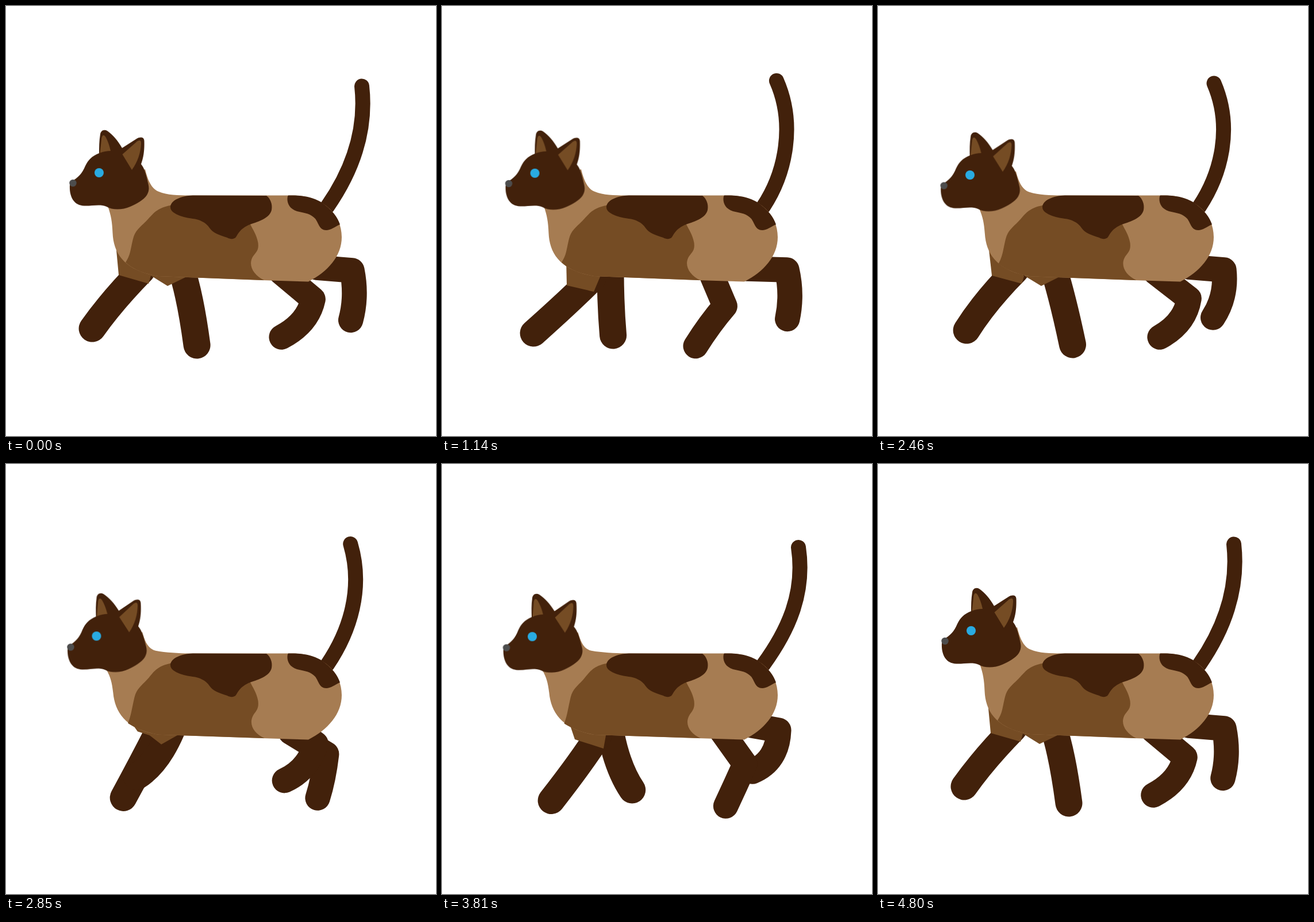
Write an HTML page without scripts that moves like this. It is 748 px wide and 748 px high and loops after 4.95 s.

```html
<!DOCTYPE html>
<html lang="en">
<head>
<meta charset="utf-8">
<title>Walking cat</title>
<style>
html, body { margin: 0; width: 100%; height: 100%; overflow: hidden; background: #fff; }
svg { display: block; width: 100vw; height: 100vh; }
:root { --dark: #42210b; --brown: #754c24; --tan: #a67c52; }
.dark { fill: var(--dark); }
.brown { fill: var(--brown); }
.tan { fill: var(--tan); }
.limb { fill: none; stroke: var(--dark); stroke-linecap: round; stroke-linejoin: round; }
.fore { stroke-width: 47px; }
.hind { stroke-width: 43.5px; }
.tail { stroke-width: 26px; }

/* 4.8 s of motion (two strides, four nods, one tail sway), then a short rest */
.limb, .cuff, .nod { animation: 4.95s linear infinite; }
.tail { animation-name: tail; }
.far.fore { animation-name: far-fore; }
.near.fore { animation-name: near-fore; }
.far.hind { animation-name: far-hind; }
.near.hind { animation-name: near-hind; }
.far.cuff { animation-name: far-cuff; }
.near.cuff { animation-name: near-cuff; }
.head { animation-name: head; transform-origin: 495px 457px; }
.trunk { animation-name: trunk; }
.saddle { animation-name: saddle; }

@keyframes tail {
  0%, 96.97%, 100% { d: path("M559 349C600 290 628 220 619 139.5"); }
  23.03% { d: path("M559 349C598 290 615 205 582 130"); animation-timing-function: ease-out; }
  35.5% { d: path("M559 349C590 290 606 206 563 126.5"); animation-timing-function: ease-in; }
  38.788% { d: path("M559 349C590 290 606 207 564.5 127"); }
  49.697% { d: path("M559 349C598 290 617 210 584.5 134.5"); }
  66.061% { d: path("M559 349C600 290 627 222 615 144"); animation-timing-function: ease-out; }
  76.97% { d: path("M559 349C602 290 632 225 620 145"); }
  87.27% { d: path("M559 349C603 290 633 222 623 143.5"); animation-timing-function: ease-in; }
}

@keyframes far-fore {
  0%, 48.485%, 96.97%, 100% { d: path("M236 460Q185 512 150 561"); }
  1.212%, 49.697% { d: path("M239 460Q187 512 154 564"); }
  9.394%, 57.879% { d: path("M266 465Q240 518 206 581"); }
  17.576%, 66.061% { d: path("M284 460Q281 525 259 572"); }
  23.03%, 71.515% { d: path("M293 460Q293 520 297.5 573"); }
  28.485%, 76.97% { d: path("M294 470Q306 530 331 567"); }
  38.788%, 87.273% { d: path("M262 462Q230 515 172 529"); }
  44.848%, 93.333% { d: path("M245 468Q195 520 142 544"); }
}
@keyframes near-fore {
  0%, 48.485%, 96.97%, 100% { d: path("M304 455Q320 500 332 590"); }
  1.212%, 49.697% { d: path("M305 455Q322 510 338.5 589"); }
  4.242%, 52.727% { d: path("M304 462Q318 530 339 573"); }
  11.515%, 60% { d: path("M280 464Q236 517 172 529"); }
  17.576%, 66.061% { d: path("M262 476Q205 522 143.5 545"); }
  23.03%, 71.515% { d: path("M262 473Q220 515 159 569"); }
  28.485%, 76.97% { d: path("M272 472Q245 515 190 585.5"); }
  38.788%, 87.273% { d: path("M306 465Q295 530 265.5 590"); }
}
@keyframes far-cuff {
  0%, 48.485%, 96.97%, 100% { d: path("M192 425L196 468 248 483 252 469 230 430Z"); }
  1.212%, 49.697% { d: path("M193 425L198 469 250 483 254 470 230 430Z"); }
  9.394%, 57.879% { d: path("M222 455L230 465 282 482 288 470 250 430Z"); }
  17.576%, 66.061% { d: path("M240 440L250 460 285 466 290 460 260 430Z"); }
  38.788%, 87.273% { d: path("M220 430L232 450 262 464 270 455 250 430Z"); }
  44.848%, 93.333% { d: path("M205 440L206 465 255 486 260 468 240 430Z"); }
}
@keyframes near-cuff {
  0%, 48.485%, 96.97%, 100% { d: path("M240 460L252 469 281 487 312 472 270 440Z"); }
  1.212%, 49.697% { d: path("M242 460L256 470 284 487 314 472 272 440Z"); }
  11.515%, 60% { d: path("M230 440L234 462 266 488 300 468 262 430Z"); }
  17.576%, 66.061% { d: path("M219 440L219 470 265 496 278 468 250 430Z"); }
  23.03%, 71.515% { d: path("M216 440L217 486 264 497 275 471 250 430Z"); }
  28.485%, 76.97% { d: path("M223 455L231 479 281 495 285 472 255 430Z"); }
  38.788%, 87.273% { d: path("M240 455L252 468 268 483 323 472 280 440Z"); }
}
@keyframes far-hind {
  0%, 48.485%, 96.97%, 100% { d: path("M478 463L534 510Q525 552 479 576"); }
  1.212%, 49.697% { d: path("M482 463L541 509Q534 552 490 576"); }
  12.121%, 60.606% { d: path("M500 468L564 503Q560 545 562 583"); }
  17.576%, 66.061% { d: path("M500 463L585 481Q597 522 611.5 564.5"); }
  23.03%, 71.515% { d: path("M530 457L600 459Q610 502 601 544.5"); }
  28.485%, 76.97% { d: path("M540 455L586 463Q584 517 540 535"); }
  38.788%, 87.273% { d: path("M462 470L485 517Q455 552 414.5 565.5"); }
}
@keyframes near-hind {
  0%, 48.485%, 96.97%, 100% { d: path("M540 455L602 460Q611 505 600 546.5"); }
  1.212%, 49.697% { d: path("M540 454L602 459Q607 505 583 542"); }
  4.848%, 53.333% { d: path("M540 455L588 463Q584 517 542 537"); }
  14.545%, 63.03% { d: path("M458 468L477 517Q450 552 411 568"); }
  17.576%, 66.061% { d: path("M454 462L466 520Q437 550 413.5 587"); }
  23.03%, 71.515% { d: path("M468 465L492 522Q466 552 441 591.5"); }
  28.485%, 76.97% { d: path("M485 463L527 522Q510 560 493.5 595"); }
  38.788%, 87.273% { d: path("M520 485L558 507Q552 545 552 594"); }
}

@keyframes head {
  0%, 24.242%, 48.485%, 72.727%, 96.97%, 100% { transform: none; animation-timing-function: cubic-bezier(.2, .4, .6, 1); }
  6.061%, 30.303%, 54.545%, 78.788% { transform: rotate(-1.95deg); animation-timing-function: cubic-bezier(.4, 0, .7, .6); }
  14.303%, 38.545%, 62.788%, 87.03% { transform: rotate(.1deg); animation-timing-function: ease-out; }
  18.182%, 42.424%, 66.667%, 90.909% { transform: rotate(1.08deg); animation-timing-function: ease-in-out; }
  23.03%, 47.273%, 71.515%, 95.758% { transform: rotate(-.15deg); }
}
@keyframes trunk {
  0%, 24.242%, 48.485%, 72.727%, 96.97%, 100% { d: var(--trunk-mid); animation-timing-function: cubic-bezier(.2, .4, .6, 1); }
  6.061%, 30.303%, 54.545%, 78.788% { d: var(--trunk-low); animation-timing-function: cubic-bezier(.4, 0, .7, .6); }
  14.303%, 38.545%, 62.788%, 87.03% { d: var(--trunk-mid); animation-timing-function: ease-out; }
  18.182%, 42.424%, 66.667%, 90.909% { d: var(--trunk-high); animation-timing-function: ease-in-out; }
  23.03%, 47.273%, 71.515%, 95.758% { d: var(--trunk-mid); }
}
@keyframes saddle {
  0%, 24.242%, 48.485%, 72.727%, 96.97%, 100% { d: var(--saddle-mid); animation-timing-function: cubic-bezier(.2, .4, .6, 1); }
  6.061%, 30.303%, 54.545%, 78.788% { d: var(--saddle-low); animation-timing-function: cubic-bezier(.4, 0, .7, .6); }
  14.303%, 38.545%, 62.788%, 87.03% { d: var(--saddle-mid); animation-timing-function: ease-out; }
  18.182%, 42.424%, 66.667%, 90.909% { d: var(--saddle-high); animation-timing-function: ease-in-out; }
  23.03%, 47.273%, 71.515%, 95.758% { d: var(--saddle-mid); }
}
.trunk {
  --trunk-mid: path("M242 284C246 300 252 318 266 323C280 329 300 329.5 320 329.5L500 329.5C548 330 584 360 584 402C584 435 560 462 526 479.5L445 477 265 470C205 460 187 430 185.5 395C184.5 375 183 365 177 348L200 300Z");
  --trunk-low: path("M236 294C240 308 245 322 259 325C278 328 300 329 320 329.5L500 329.5C548 330 584 360 584 402C584 435 560 462 526 479.5L445 477 265 471C212 462 190 435 186.5 398C184 380 182 373 174 359L200 310Z");
  --trunk-high: path("M246 278C250 295 256 317 271 323C285 329 302 329.5 320 329.5L500 329.5C548 330 584 360 584 402C584 435 560 462 526 479.5L445 477 265 468C205 458 187 428 185.5 395C185 375 184 362 179 343L200 296Z");
}
.saddle {
  --saddle-mid: path("M300 345C262 348 256 362 244 374C232 386 225 390 221 405C216 425 217 432 208 446C219.5 457 238 465.5 265 470L449 477C430 468 420 450 430 435C436 427 440 424 438.5 412C436 398 430 390 424 378Z");
  --saddle-low: path("M300 345C262 348 257 363 246 375C235 387 228 391 224 406C219 428 218 438 213 452C227 460.5 244 467 265 471L450 477C431 469 421 452 431 436C437 428 440 424 438.5 412C436 398 430 390 424 378Z");
  --saddle-high: path("M300 345C262 348 256 362 244 374C232 386 225 390 220 404C215 423 215 429 206 442C219 455 238 463.5 265 468L448 477C429 468 419 449 429 434C436 426 440 424 438.5 412C436 398 430 390 424 378Z");
}
</style>
</head>
<body>
<svg viewBox="0 0 748 748">
  <path class="limb hind far"/>
  <path class="limb fore far"/>
  <path class="cuff far brown"/>
  <path class="limb hind near"/>
  <path class="limb fore near"/>
  <path class="cuff near brown"/>
  <path class="limb tail"/>

  <path class="nod trunk tan"/>
  <path class="nod saddle brown"/>
  <path class="dark" d="M286 350C286 338 305 330 325 329.5L453 330C460 335 464 345 462 355C458 372 430 377 420 382C408 388 404 395 400 402C397 406 390 406 385 403C370 398 360 395 354 386C348 376 335 371 325 370C310 368 286 362 286 350Z"/>
  <path class="dark" d="M490 331C488 340 491 352 506 357C520 360 530 361 538 370C544 378 545 390 557 390C565 390 572 384 581 380C577 368 568 355 548 341C530 331 512 329 491 329.5Z"/>

  <g class="nod head">
    <path class="dark" d="M111 312C110 330 117 347 136 347.5C150 348 164 344 175 349C185 355 202 355 216 349C226 345 240 337 245 329C251 319 248 312 246 303C243 290 240 281 235 275C240 262 241 248 240.5 234C240 228 234 227 227 231L202 247C194 233 186 224 176 217C170 214 165 217 164 223C162 235 162 246 162 256C149 261 143 268 138 278C132 292 126 298 113 306Z"/>
    <path class="brown" d="M163.500 255.500L166.500 229Q169 221 173.500 228Q179 238 182 252Q172 252 163.500 255.500Z"/>
    <path class="brown" d="M202.500 258L228 235.500Q235 230.500 235 239Q234 264 219 285Z"/>
    <circle cx="162" cy="290" r="8" fill="#29abe2"/>
    <circle cx="116.500" cy="308" r="6.200" fill="#4d4d4d"/>
  </g>
</svg>
</body>
</html>
```
